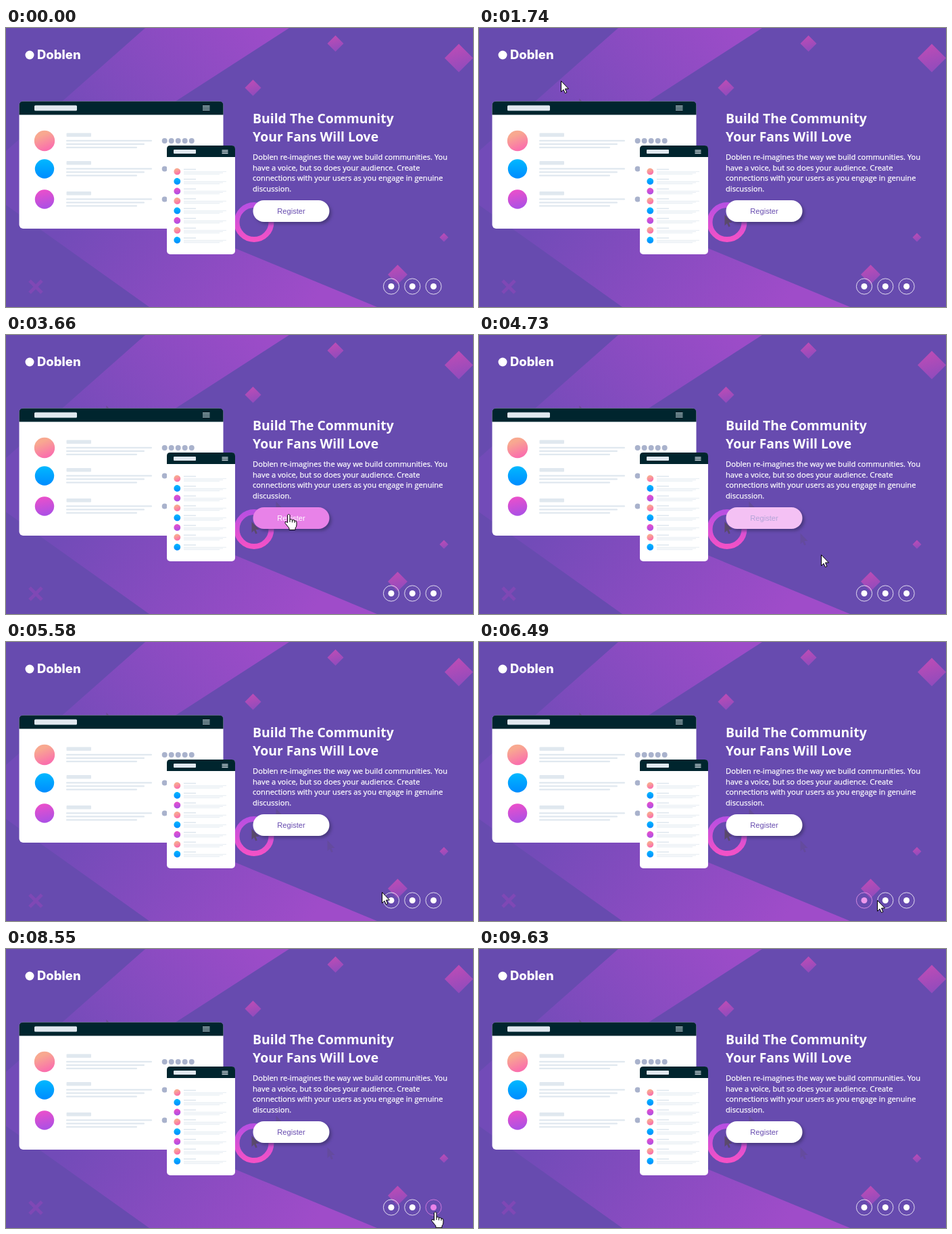
An HTML page that plays this animation: 691x413 px, repeating every 9.7 s.

```html
<!DOCTYPE html>
<html lang="en">
<head>
<meta charset="utf-8">
<title>Landing page</title>
<style>
  html, body { margin: 0; width: 100%; height: 100%; overflow: hidden; background: #674baf; }
  svg { display: block; width: 691px; height: 413px; }
  .heading { font: 700 19.4px "Open Sans", sans-serif; }
  .copy { font: 400 11.2px "Open Sans", sans-serif; stroke: #fff; stroke-width: .25; }
  .brand { font: 800 18.5px Inter, sans-serif; }
  .label { font: 11.2px "Liberation Sans", Arial, sans-serif; text-anchor: middle; }
  #button { filter: drop-shadow(3px 3px 2px #3a3068aa); }
  #cursor path { stroke: #000; stroke-linejoin: round; }
</style>
</head>
<body>
<svg viewBox="0 0 691 413">
  <defs>
    <linearGradient id="upper" gradientUnits="userSpaceOnUse" x1="380" y1="0" x2="120" y2="200">
      <stop stop-color="#9c4cc8"/><stop offset="1" stop-color="#724bb8"/>
    </linearGradient>
    <linearGradient id="lower" gradientUnits="userSpaceOnUse" x1="450" y1="413" x2="150" y2="200">
      <stop stop-color="#9f4cc9"/><stop offset="1" stop-color="#724bb8"/>
    </linearGradient>
    <linearGradient id="gem" x1=".3" y1="0" x2=".6" y2="1">
      <stop stop-color="#bf4cb5"/><stop offset="1" stop-color="#8f4bbd"/>
    </linearGradient>
    <linearGradient id="ring" x2="0" y2="1">
      <stop stop-color="#b94fe2"/><stop offset="1" stop-color="#f351c6"/>
    </linearGradient>
    <linearGradient id="peach" x2=".4" y2="1">
      <stop offset=".3" stop-color="#f8a890"/><stop offset="1" stop-color="#fa70ac"/>
    </linearGradient>
    <linearGradient id="blue" x2="0" y2="1">
      <stop stop-color="#00b8ff"/><stop offset="1" stop-color="#008cff"/>
    </linearGradient>
    <linearGradient id="violet" x2=".2" y2="1">
      <stop stop-color="#f04fc8"/><stop offset="1" stop-color="#ae50e4"/>
    </linearGradient>
  </defs>

  <path fill="url(#upper)" d="M206 0H419L80 219H0V182Z"/>
  <path fill="url(#lower)" d="M0 219H80L549 413H212L0 262Z"/>
  <g id="gems" fill="url(#gem)"></g>
  <path d="M35 374 53 392M53 374 35 392" stroke="#7f48b5" stroke-width="5"/>
  <circle cx="367" cy="287.5" r="25.5" fill="none" stroke="url(#ring)" stroke-width="8"/>
  <g id="trail"></g>
  <g id="screens"></g>

  <g fill="#fff">
    <circle cx="35" cy="40" r="6.5"/>
    <text class="brand" x="46" y="46">Doblen</text>
    <g id="heading" class="heading"></g>
    <g id="copy" class="copy"></g>
  </g>

  <rect id="button" x="365.5" y="255" width="113" height="32" rx="16"/>
  <text id="label" class="label" x="422" y="275">Register</text>
  <g id="social"></g>

  <g id="cursor">
    <path id="arrow" fill="#fff" d="M.5 .5V16.5L4 13.2 6.4 18.5 8.8 17.5 6.5 12H11.5Z"/>
    <g id="hand">
      <path fill="#fff" d="M-1.5 2C-1.5 0 2 0 2 2V8Q5 7 5.5 9 8.5 8 9 10 12 9.5 12 12V16Q12 19 10 21V23.5H1V21L-5 13.5Q-5.5 10.5-3 11.5L-1.5 13Z"/>
      <path fill="none" d="M2 8v4M5.5 9v3.5M9 10v3"/>
    </g>
  </g>
</svg>

<script>
const LOOP = 9700, STEP = 70, FADE = 300;
const $ = id => document.getElementById(id);
const repeat = (n, fn) => Array.from({ length: n }, (_, i) => fn(i)).join('');
const rect = (x, y, w, h, fill, rx = 0) =>
  `<rect x="${x}" y="${y}" width="${w}" height="${h}" rx="${rx}" fill="${fill}"/>`;
const disc = (x, y, r, fill) => `<circle cx="${x}" cy="${y}" r="${r}" fill="${fill}"/>`;
const diamond = (x, y, r) => `<path d="M${x} ${y - r}l${r} ${r} ${-r} ${r} ${-r} ${-r}z"/>`;

$('gems').innerHTML = diamond(487.5, 23, 12) + diamond(670, 44.5, 21) + diamond(365.5, 88.5, 12) +
  diamond(648, 310, 6.5) + diamond(579.5, 365, 14.5);

const paragraph = (lines, y, leading) =>
  lines.map((line, i) => `<text x="365" y="${y + i * leading}">${line}</text>`).join('');
$('heading').innerHTML = paragraph(['Build The Community', 'Your Fans Will Love'], 141, 27);
$('copy').innerHTML = paragraph([
  'Doblen re-imagines the way we build communities. You',
  'have a voice, but so does your audience. Create',
  'connections with your users as you engage in genuine',
  'discussion.'
], 195, 15.7);

// Mock-up windows
const LINE = '#e0e8ef', AVATARS = ['peach', 'blue', 'violet'].map(id => `url(#${id})`);

function screen(x, y, w, h, bar, r) {
  return rect(x, y, w, h, '#fff', r) +
    `<path fill="#00252e" d="M${x} ${y + bar}v${r - bar}q0 ${-r} ${r} ${-r}h${w - 2 * r}q${r} 0 ${r} ${r}v${bar - r}z"/>`;
}
const menu = (x, y, w, gap) => repeat(3, i => rect(x, y + i * gap, w, 1.2, LINE));

function desktop() {
  const rows = [167, 208.5, 253.5].map((y, row) =>
    disc(57, y, row ? 14.2 : 15.2, AVATARS[row]) + rect(89.5, y - 11.5, 36.5, 5.5, LINE, 1) +
    repeat(3, i => rect(89, y - 1.3 + i * 5, 127 - 11 * i, 2.4, LINE, 1)) +
    repeat(5, i => disc(234.7 + i * 10, y, 4, '#a9b2cc')));
  return screen(19.5, 108.5, 302, 188.5, 20, 6) + rect(42, 114.5, 63, 8, LINE, 1.5) +
    menu(291, 115, 10.5, 2.8) + rows.join('');
}
function phone() {
  const row = i => {
    const y = 212.5 + i * 14.5;
    return disc(253.3, y, 4.9, AVATARS[i % 3]) + rect(263, y - 4, 18, 1.6, LINE) +
      repeat(3, k => rect(263, y - .2 + k * 1.8, 63 - 5 * k, .8, LINE));
  };
  return screen(238, 174, 101, 161, 17, 5) + rect(248, 180, 33, 6, LINE, 1) +
    menu(319.5, 180.5, 9, 2.2) + repeat(8, row);
}
$('screens').innerHTML = desktop() + phone();

// Three round icon buttons in a row
const ICON_Y = 382.5, ICON_R = 12, iconX = i => 570 + 31.3 * i;
$('social').innerHTML = repeat(3, i => `<g>${disc(iconX(i), ICON_Y, 4.5, 'currentColor')}
  <circle cx="${iconX(i)}" cy="${ICON_Y}" r="11.6" fill="none" stroke="currentColor" stroke-width=".8"/></g>`);
const icons = [...$('social').children];

// Pointer glides from stop to stop; bow bends the way there up or down
const START = { x: 604, y: 398 };
const stops = [
  { from: 760, to: 1740, x: 121, y: 78, bow: 38 },
  { from: 1740, to: 2230, x: 67, y: 34 },
  { from: 2390, to: 3370, x: 418, y: 265, bow: -30 },
  { from: 4380, to: 4730, x: 506, y: 325, bow: -12 },
  { from: 4730, to: 5360, x: 552, y: 367 },
  { from: 5360, to: 6060, x: 570, y: 380 },
  { from: 6140, to: 6770, x: 602, y: 383 },
  { from: 6900, to: 8020, x: 635, y: 387 },
  { from: 8480, to: 9040, x: 643, y: 430 }
];
const smooth = p => p * p * (3 - 2 * p);

function pointerAt(t) {
  const i = stops.findLastIndex(stop => stop.from <= t);
  if (i < 0) return null;
  const { from, to, x, y, bow = 0 } = stops[i], last = stops[i - 1] || START;
  const held = Math.floor((t - from) / STEP) * STEP;
  const u = smooth(Math.min(1, held / (to - from)));
  return {
    x: Math.round(last.x + (x - last.x) * u),
    y: Math.round(last.y + (y - last.y) * u + bow * 4 * u * (1 - u))
  };
}

// Hover is read from the pointer; its fade is the share of recent time spent inside
const overButton = p => p.x > 365 && p.x < 479 && p.y > 255 && p.y < 287;
const overIcon = i => p => Math.hypot(p.x - iconX(i), p.y - ICON_Y) < ICON_R;
const targets = [overButton, ...icons.map((_, i) => overIcon(i))];

function hoverAmounts(t, samples = 30) {
  const recent = Array.from({ length: samples }, (_, i) => pointerAt(t - i * FADE / samples));
  return targets.map(over => smooth(recent.filter(p => p && over(p)).length / samples));
}

// The pointer leaves a few marks, each fainter than the one before
const markTimes = [1250, 1600, 3230, 4590, 8900];
$('trail').innerHTML = markTimes.map((time, i) => {
  const { x, y } = pointerAt(time);
  return `<path transform="translate(${x} ${y})" fill="#5a4a68" opacity="${.95 / (i + 1)}" d="${$('arrow').getAttribute('d')}"/>`;
}).join('');
const trail = [...$('trail').children];

const mix = (a, b, u) => `rgb(${a.map((v, i) => Math.round(v + (b[i] - v) * u))})`;
const show = (element, visible) => element.style.display = visible ? '' : 'none';
const WHITE = [255, 255, 255], PINK = [232, 130, 232], VIOLET = [103, 75, 175];

function draw(now) {
  const t = now % LOOP, pointer = pointerAt(t);
  const [press, ...glow] = hoverAmounts(t);
  $('button').setAttribute('fill', mix(WHITE, PINK, press));
  $('label').setAttribute('fill', mix(VIOLET, WHITE, press));
  icons.forEach((icon, i) => icon.style.color = mix(WHITE, PINK, glow[i]));
  trail.forEach((mark, i) => show(mark, t > markTimes[i] + STEP));

  show($('cursor'), pointer);
  if (pointer) {
    const pointing = targets.some(over => over(pointer));
    show($('arrow'), !pointing);
    show($('hand'), pointing);
    $('cursor').setAttribute('transform', `translate(${pointer.x} ${pointer.y})`);
  }
  requestAnimationFrame(() => draw(performance.now()));
}
draw(0);
</script>
</body>
</html>
```
